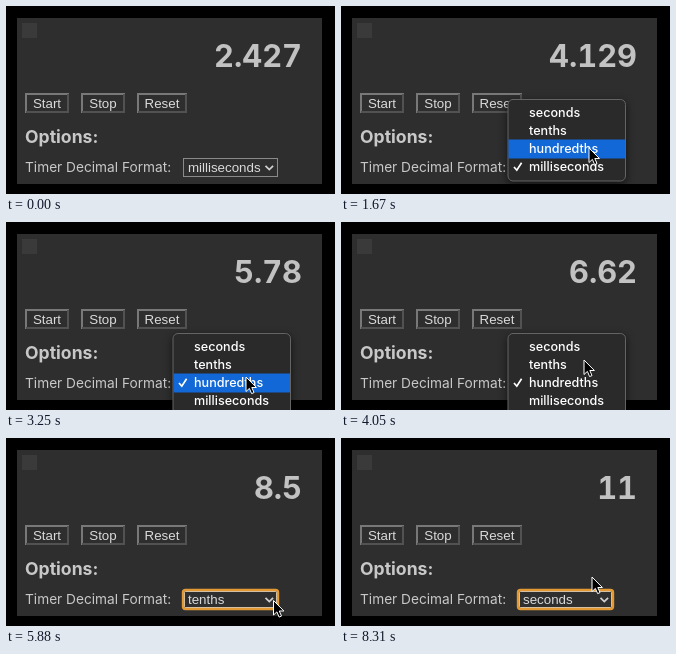
These frames come from a looping animation (329x188 px, 8.39 s). An HTML page:

```html
<!DOCTYPE html>
<html lang="en">
<head>
<meta charset="utf-8">
<title>Timer</title>
<style>
html, body { margin: 0; width: 100%; height: 100%; overflow: hidden; background: #000; }
svg { display: block; }
text { fill: #c8c8c8; font-family: Inter, sans-serif; white-space: pre; }
#time { font-size: 30.8px; font-weight: 700; text-anchor: end; font-variant-numeric: tabular-nums; fill: #c2c2c2; }
.ctl { font: 13.33px "Liberation Sans", Arial, sans-serif; fill: #dadada; }
.mid { text-anchor: middle; }
.line { fill: none; }
#menu { filter: drop-shadow(0 3px 4px #0009); }
#menu text { font-size: 12.6px; font-weight: 500; fill: #fff; }
</style>
</head>
<body>
<svg width="329" height="188" viewBox="0 0 329 188">
  <rect x="11" y="12" width="305" height="166" fill="#2e2e2e"/>
  <rect x="16" y="17" width="15" height="15" fill="#3a3a3a"/>
  <text id="time" x="296" y="61.3"></text>
  <g id="buttons"></g>
  <text x="19" y="137" font-size="17.6" font-weight="700">Options:</text>
  <text x="19" y="166" font-size="13.7">Timer Decimal Format:</text>
  <rect x="177.5" y="152.5" width="94" height="18" fill="#2f2f2f" stroke="#8a8a8a"/>
  <g id="ring" class="line">
    <rect x="177" y="152" width="95" height="19" rx="2.5" stroke="#e39a35" stroke-width="2.4"/>
    <rect x="178.5" y="153.5" width="92" height="16" rx="1" stroke="#f3dfbd" stroke-width=".8"/>
  </g>
  <text id="value" class="ctl" x="182" y="166"></text>
  <path class="line" d="M259.5 159.8l3.8 3.8 3.8-3.8" stroke="#d0d0d0" stroke-width="1.7"/>
  <g id="menu">
    <rect x="167" y=".5" width="117.5" height="81.5" rx="5" fill="#2a2a2a" stroke="#646464"/>
    <rect id="bar" x="167.5" width="116.5" height="19" fill="#1168d6"/>
    <path id="check" class="line" stroke="#fff" stroke-width="1.7"/>
    <g id="rows"></g>
  </g>
  <path id="cursor" d="M0 0V14.5L3.4 11.4 5.6 16.6 8 15.6 5.8 10.5H10.4Z" fill="#000" stroke="#fff"/>
</svg>
<script>
const $ = id => document.getElementById(id);
const LOOP = 8390, STEPS = 106, STEP = LOOP / STEPS;
const ROW = 18, BASE = 152; // the checked row always opens over the select
const GLIDE = 6, FLASH = 2, FADE = 2;
const formats = ["seconds", "tenths", "hundredths", "milliseconds"];

// Times are in steps. Each menu picks the next coarser format.
const menus = [[6, 23], [36, 51], [78, 86]].map(([open, pick], i) => ({ open, pick, from: 3 - i }));

// The pointer glides to each stop, arriving at the given step.
const stops = [
  { at: 0, x: 262, y: 190 },
  { at: 7, x: 248, y: 157 },
  { at: 18, x: 248, y: 142 },
  { at: 32, x: 240, y: 155 },
  { at: 50, x: 243, y: 138 },
  { at: 60, x: 284, y: 165 },
  { at: 77, x: 251, y: 160 },
  { at: 83, x: 251, y: 139 }
];

$("buttons").innerHTML = [["Start", 19, 44], ["Stop", 75, 44], ["Reset", 131, 50]].map(([name, x, w]) =>
  `<g class="line" stroke-width="2"><path d="M${x + 1} 107V88H${x + w}" stroke="#787878"/>
  <path d="M${x + 1} 106H${x + w - 1}V88" stroke="#525252"/></g>
  <text class="ctl mid" x="${x + w / 2}" y="102">${name}</text>`).join("");
$("rows").innerHTML = formats.map((name, i) => `<text x="188" y="${ROW * i + 18}">${name}</text>`).join("");

function smooth(from, length, k) {
  const u = Math.min(1, Math.max(0, (k - from) / length));
  return u * u * (3 - 2 * u);
}
const show = (id, on) => $(id).style.display = on ? "" : "none";

// The clock runs evenly, with a slight speed-up in the middle.
const elapsed = k => Math.floor(2427 + 80.92 * k + 144 * smooth(15, 70, k));

function pointer(k) {
  let { x, y } = stops[0];
  for (const s of stops) {
    const u = smooth(s.at - GLIDE, GLIDE, k);
    x += (s.x - x) * u;
    y += (s.y - y) * u;
  }
  return { x, y };
}

function drawMenu(k, y) {
  const m = menus.find(m => k >= m.open && k < m.pick + FLASH + FADE);
  show("menu", m);
  if (!m) return;
  const row = Math.floor((y - BASE) / ROW) + m.from;
  $("menu").setAttribute("transform", `translate(0 ${BASE - 5 - ROW * m.from})`);
  $("menu").style.opacity = Math.min(1, 1 - (k - m.pick - FLASH + 1) / (FADE + 1));
  $("bar").setAttribute("y", ROW * row + 4.5);
  $("check").setAttribute("d", `M173 ${ROW * m.from + 14}l2.8 3.2 4.8-7.4`);
  show("bar", k !== m.pick);
}

function draw(k) {
  const digits = 3 - menus.filter(m => k >= m.pick + FLASH).length;
  const unit = 10 ** (3 - digits);
  $("time").textContent = (Math.floor(elapsed(k) / unit) * unit / 1000).toFixed(digits);
  $("value").textContent = formats[digits];
  show("ring", k >= menus[0].open);

  const { x, y } = pointer(k);
  $("cursor").setAttribute("transform", `translate(${x} ${y})`);
  show("cursor", k > 0);
  drawMenu(k, y);
}

function frame(now) {
  draw(Math.min(STEPS - 1, Math.floor((now % LOOP + 5) / STEP)));
  requestAnimationFrame(frame);
}
requestAnimationFrame(frame);
</script>
</body>
</html>
```
